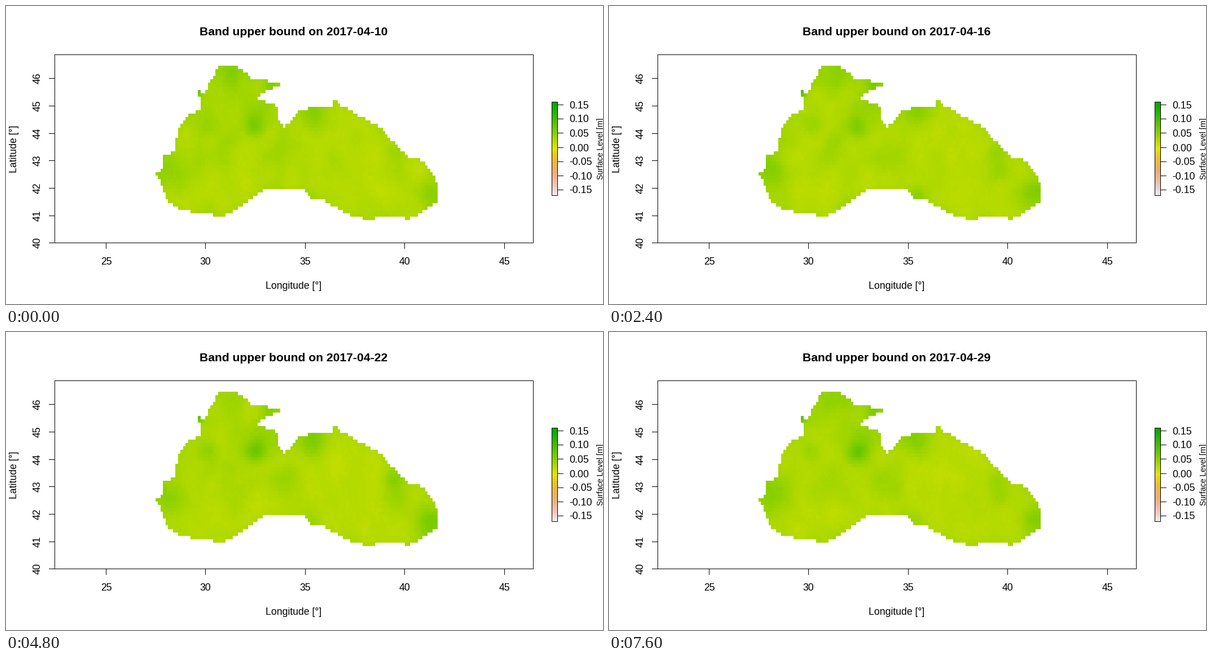
Animation of 1058 by 529 pixels, one loop 8 s. Source, as a matplotlib script:

```python
import colorsys

import numpy as np
import matplotlib.pyplot as plt
from matplotlib.animation import FuncAnimation
from matplotlib.colors import ListedColormap
from matplotlib.patches import Rectangle
from matplotlib.path import Path

W, H, DPI = 1058, 529, 100
DAYS, STEP = 20, 400
ROWS, COLS = 45, 113
X0, X1, Y0, Y1 = 265, 764.5, 106, 379.7
VMIN, VMAX = -0.171, 0.160
PX = 72 / DPI

plt.rcParams["font.family"] = "Liberation Sans"

# Key points of the shoreline in pixels, clockwise from the north-west
NORTH_SHORE = [
    (379, 105), (407, 105), (436, 128), (458, 132), (486, 137), (486, 142),
    (470, 147), (442, 162), (481, 178), (482, 204), (490, 214), (500, 209),
    (520, 187), (542, 179), (577, 177), (578, 166), (586, 166), (587, 174),
    (606, 183), (637, 202), (656, 210), (672, 222), (683, 238), (699, 256),
    (714, 269), (736, 274), (758, 300), (765, 320),
]
SOUTH_SHORE = [
    (765, 345), (745, 361), (712, 380), (700, 373), (656, 373), (648, 380),
    (638, 378), (606, 370), (585, 358), (564, 346), (542, 342), (528, 326),
    (459, 326), (405, 362), (386, 373), (336, 367), (300, 357), (284, 342),
    (272, 306), (264, 298), (279, 289), (280, 266), (300, 257), (304, 220),
    (322, 194), (342, 186), (345, 163), (340, 160), (340, 148), (345, 148),
    (349, 158),
]

# Recurring highs: centre x, y, radius, typical strength in mm
HIGHS = [
    (440, 214, 13, 32), (452, 186, 21, 20), (400, 123, 20, 17),
    (470, 139, 11, 30), (342, 153, 5, 45), (357, 211, 12, 14),
    (288, 290, 24, 23), (386, 270, 16, 9), (400, 240, 12, 8),
    (490, 264, 23, 12), (545, 192, 18, 28), (687, 262, 12, 20),
    (694, 292, 14, 18), (752, 335, 20, 33), (545, 336, 11, 13),
    (370, 180, 65, 7),
]


def terrain(n=255):
    """White through sand and yellow to green."""
    colors = []
    for t in np.linspace(-1, 1, n):
        if t < 0:
            hsv = ((1 + t) / 6, 1 + t, 0.9 - 0.05 * t)
        else:
            hsv = ((1 + t) / 6, 1, 0.9 - 0.25 * t)
        colors.append(colorsys.hsv_to_rgb(*hsv))
    return ListedColormap(colors)


def smooth(z, rounds):
    for _ in range(rounds):
        for axis in (0, 1):
            z = (np.roll(z, 1, axis) + 2 * z + np.roll(z, -1, axis)) / 4
    return z


def centres(a, b, n):
    return a + (np.arange(n) + 0.5) * (b - a) / n


gx, gy = np.meshgrid(centres(X0, X1, COLS), centres(Y0, Y1, ROWS))
shore = Path(NORTH_SHORE + SOUTH_SHORE)
SEA = shore.contains_points(np.c_[gx.ravel(), gy.ravel()]).reshape(gx.shape)
COAST = np.clip(1 - smooth(SEA.astype(float), 6), 0, 0.5)


def level(day):
    """Sea level of one day in metres, land masked."""
    rng = np.random.default_rng(400 + day)
    z = 22 + 12 * COAST
    for x, y, r, mm in HIGHS:
        dist = ((gx - x) ** 2 + (gy - y) ** 2) / r ** 2
        z += mm * rng.uniform(0.7, 1.3) * np.exp(-dist / 2)
    swell = smooth(rng.normal(size=z.shape), 10)
    z += 2.5 * swell / swell.std() + 0.8 * rng.normal(size=z.shape)
    return np.ma.array(np.maximum(z, 14) / 1000, mask=~SEA)


fig = plt.figure(figsize=(W / DPI, H / DPI), dpi=DPI, facecolor="white")
ax = fig.add_axes([0, 0, 1, 1])
cmap = terrain()


def line(x, y):
    ax.plot(x, y, color="black", lw=PX, solid_capstyle="butt", snap=False)


def box(x, y, w, h):
    ax.add_patch(Rectangle((x, y), w, h, fill=False, ec="black", lw=PX,
                           snap=False))


def grid(z, x0, x1, y0, y1):
    return ax.imshow(z, cmap=cmap, vmin=VMIN, vmax=VMAX, aspect="auto",
                     interpolation="nearest", extent=(x0, x1, y1, y0))


def label(x, y, s, size=17.6, ha="center", **kw):
    return ax.text(x, y, s, fontsize=size * PX, ha=ha, **kw)


def side_label(x, y, s, size=17.6):
    label(x, y, s, size, rotation=90, va="center")


sea = grid(level(0), X0, X1, Y0, Y1)
grid(np.linspace(VMAX, VMIN, 255)[:, None], 967, 977, 170, 337)
ax.set(xlim=(0, W), ylim=(H, 0))
ax.axis("off")

box(86.5, 86.5, 848, 334)
for lon in range(25, 50, 5):
    x = np.floor(177 + (lon - 25) * 35.3) + 0.5
    line([x, x], [421, 431])
    label(x, 459, lon)
for lat in range(40, 47):
    y = np.floor(420.9 - (lat - 40) * 48.7) + 0.5
    line([76, 86], [y, y])
    side_label(56, y, lat)

box(967.5, 170.5, 10, 166)
for i in range(-3, 4):
    y = np.floor(251 - i * 25.1) + 0.5
    line([978, 988], [y, y])
    label(998, y + 6, f"{i * 0.05:.2f}", ha="left")

label(509.5, 501.5, "Longitude [°]")
side_label(14.5, 253.5, "Latitude [°]")
side_label(1054, 253, "Surface Level [m]", 14)
title = label(510, 52, "", 21.2, weight="bold")


def draw(day):
    sea.set_data(level(day))
    title.set_text(f"Band upper bound on 2017-04-{10 + day}")
    return sea, title


anim = FuncAnimation(fig, draw, frames=DAYS, interval=STEP, repeat=True,
                     repeat_delay=0)
plt.show()
```
